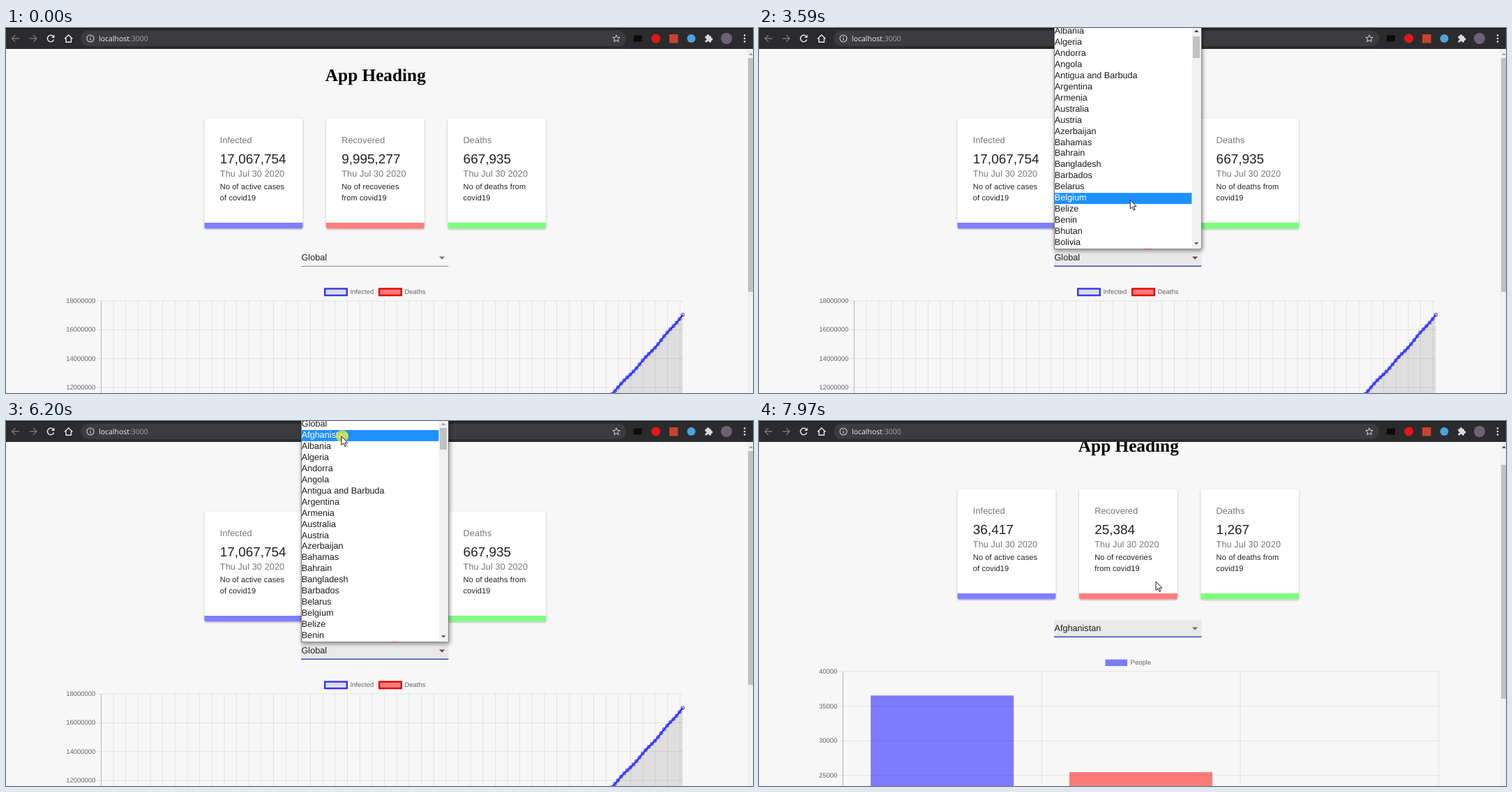
An HTML page with a canvas that plays this animation: 1071x523 px, repeating every 8000 ms.

```html
<!DOCTYPE html>
<html lang="en">
<head>
<meta charset="utf-8">
<title>Dashboard demo</title>
<style>
  html, body { margin: 0; width: 100%; height: 100%; overflow: hidden; background: #f7f7f7; }
  canvas { display: block; width: 1071px; height: 523px; }
</style>
</head>
<body>
<canvas id="stage" width="1071" height="523"></canvas>
<script>
const ctx = document.getElementById('stage').getContext('2d');
const W = 1071, H = 523, LOOP = 8000;
const SANS = '"Liberation Sans", Arial, sans-serif';
const SERIF = '"Liberation Serif", "Times New Roman", serif';
const UI = '"Open Sans", "Noto Sans", sans-serif';
const DARK = 'rgba(0,0,0,.87)', MUTED = 'rgba(0,0,0,.54)', GRID = 'rgba(0,0,0,.1)';
const BLUE = 'rgba(0,0,255,.5)', RED = 'rgba(255,0,0,.5)', GREEN = 'rgba(0,255,0,.5)';

const COUNTRIES = ('Global,Afghanistan,Albania,Algeria,Andorra,Angola,Antigua and Barbuda,Argentina,' +
  'Armenia,Australia,Austria,Azerbaijan,Bahamas,Bahrain,Bangladesh,Barbados,Belarus,Belgium,' +
  'Belize,Benin,Bhutan,Bolivia').split(',');
const CARDS = [
  { title: 'Infected', note: ['No of active cases', 'of covid19'], color: '#7f7fff', world: 17067754, local: 36542 },
  { title: 'Recovered', note: ['No of recoveries', 'from covid19'], color: '#ff7f7f', world: 9995277, local: 25471 },
  { title: 'Deaths', note: ['No of deaths from', 'covid19'], color: '#7fff7f', world: 667935, local: 1271 }
];

// Moments of redraw: [first, last, count]; the picture holds in between.
const STEPS = [
  [0, 0, 1], [840, 840, 1], [1030, 1130, 3], [1460, 1700, 4], [1770, 1940, 3], [2160, 2560, 6],
  [2820, 2820, 1], [2870, 3110, 4], [3590, 3750, 3], [4140, 4360, 4], [4760, 4910, 3],
  [5460, 6020, 8], [6200, 6200, 1], [6330, 6960, 9], [7030, 7260, 4], [7340, 7820, 7], [7890, 7970, 2]
].flatMap(([a, b, n]) => Array.from({ length: n }, (_, i) => a + (n > 1 ? (b - a) * i / (n - 1) : 0)));

// Pointer path: [time, x, y]
const PATH = [
  [980, 709, 510], [1130, 669, 445], [1400, 669, 445], [1700, 576, 328], [1940, 562, 334],
  [2740, 562, 334], [2820, 566, 329], [3110, 535, 253.5], [3530, 535, 253.5], [3750, 525, 228],
  [4080, 525, 228], [4360, 502, 120], [4700, 502, 120], [4910, 500, 141.5], [5390, 500, 141.5],
  [6020, 481, 22], [6330, 481, 22], [6960, 568, 229], [7260, 568, 229], [7820, 569, 230]
];
const OPEN = 2240, CLOSE = 6330, LOADED = 6381;
const ROW = 15.95;

const ARROW = new Path2D('M0 0V12.6L3 9.9L5 14.6L6.9 13.8L4.9 9.2H8.8Z');
const HAND = new Path2D('M3.5 11V1.8C3.5 .1 6.5 .1 6.5 1.8V6.6C7.5 5.9 9 6.2 9.2 7.2C10 6.6 11.3 7 11.5 8' +
  'C12.2 7.6 13.1 8 13.1 9V13L11.6 16.2V18.5H4.8V16.7L.7 11.6C0 10 1.6 9 3.5 11Z');

const clamp = (v, a = 0, b = 1) => Math.min(b, Math.max(a, v));

function rect(x, y, w, h, color) {
  ctx.fillStyle = color;
  ctx.fillRect(x, y, w, h);
}

function round(x, y, w, h, r, color) {
  ctx.fillStyle = color;
  ctx.beginPath();
  ctx.roundRect(x, y, w, h, r);
  ctx.fill();
}

function disc(x, y, r, color) {
  ctx.fillStyle = color;
  ctx.beginPath();
  ctx.arc(x, y, r, 0, 7);
  ctx.fill();
}

function poly(points, color) {
  ctx.fillStyle = color;
  ctx.beginPath();
  points.forEach(p => ctx.lineTo(...p));
  ctx.fill();
}

function stroke(d, color, width) {
  ctx.strokeStyle = color;
  ctx.lineWidth = width;
  ctx.stroke(new Path2D(d));
}

function text(s, x, y, size, color, { font = SANS, align = 'left', spacing = 0, weight = '' } = {}) {
  ctx.font = `${weight} ${size}px ${font}`;
  ctx.textAlign = align;
  ctx.letterSpacing = spacing + 'px';
  ctx.fillStyle = color;
  ctx.fillText(s, x, y);
}

function pointer(t) {
  const i = PATH.findIndex(p => p[0] > t);
  if (i === 0) return { x: PATH[0][1], y: PATH[0][2] };
  if (i < 0) return { x: PATH.at(-1)[1], y: PATH.at(-1)[2] };
  const [t0, x0, y0] = PATH[i - 1], [t1, x1, y1] = PATH[i];
  const k = (t - t0) / (t1 - t0);
  return { x: x0 + (x1 - x0) * k, y: y0 + (y1 - y0) * k };
}

function countUp(end, t) {
  const k = clamp(.433236 + (t - 7260) * .34979 / 710);
  return Math.round(end * (1 - 2 ** (-10 * k)) * 1024 / 1023);
}

function drawCards(t) {
  CARDS.forEach((c, i) => {
    const x = 284.5 + 174.4 * i, tx = x + 22.3;
    ctx.save();
    ctx.shadowColor = 'rgba(0,0,0,.3)';
    ctx.shadowBlur = 2.5;
    ctx.shadowOffsetY = 1;
    round(x, 129.5, 141, 158, 3.2, '#fff');
    ctx.restore();
    round(x, 279, 141, 8.5, [0, 0, 3.2, 3.2], c.color);
    const value = t < LOADED ? c.world : countUp(c.local, t);
    text(c.title, tx, 165, 12.65, MUTED, { spacing: .12 });
    text(value.toLocaleString('en-US'), tx, 193.7, 18.96, DARK);
    text('Thu Jul 30 2020', tx, 213.3, 12.65, MUTED, { spacing: .12 });
    c.note.forEach((s, n) => text(s, tx, 230.7 + 15.8 * n, 11.06, DARK, { spacing: .118 }));
  });
}

function drawSelect(t, p) {
  const focused = t >= OPEN;
  const hover = t >= 1460 && p.x > 423 && p.x < 634 && p.y > 316 && p.y < 343;
  if (focused) round(423, 317, 211.5, 25, [0, 0, 0, 0], '#e9e9e9');
  text(t < CLOSE ? 'Global' : 'Afghanistan', 423.5, 333.4, 12.65, DARK);
  const tint = focused && t < 7820 ? '#6b4a4a' : '#757575';
  poly([[621, 327.6], [629.2, 327.6], [625.1, 331.8]], tint);
  if (focused) rect(423, 340.5, 211.5, 1.6, '#3f51b5');
  else if (hover) rect(423, 340.7, 211.5, 1.3, '#555');
  else rect(423, 341.2, 211.5, .8, 'rgba(0,0,0,.55)');
}

function hLine(x0, x1, y) { rect(x0, y - .4, x1 - x0, .8, GRID); }
function vLine(x, color = GRID) { rect(x - .4, 391, .8, 400, color); }

function drawLineChart() {
  [['Infected', 457.2, GRID, '#3333ff'], ['Deaths', 535.2, RED, '#e60000']].forEach(([name, x, fill, edge]) => {
    rect(x, 373.6, 31.6, 9.5, fill);
    ctx.strokeStyle = edge;
    ctx.lineWidth = 2.4;
    ctx.strokeRect(x, 373.6, 31.6, 9.5);
    text(name, x + 36.2, 381, 9.5, '#666');
  });
  for (let i = 0; i < 4; i++) {
    const y = 391 + 41.35 * i;
    hLine(129, 970.4, y);
    text(String(18e6 - 2e6 * i), 128.4, y + 2.9, 9.5, '#666', { align: 'right' });
  }
  const day = 4.414;
  for (let i = 0; i < 48; i++) vLine(136.4 + day * 4 * i);
  vLine(136.4, 'rgba(0,0,0,.25)');

  const pts = Array.from({ length: 26 }, (_, k) =>
    [970.2 - day * k, 411 + 5.3 * k - .017 * k * k + .8 * Math.sin(.9 * k)]);
  poly([...pts, [pts.at(-1)[0], 560], [970.2, 560]], GRID);
  ctx.beginPath();
  pts.forEach(q => ctx.lineTo(...q));
  ctx.strokeStyle = '#3333ff';
  ctx.lineWidth = 2.4;
  ctx.stroke();
  pts.forEach(([x, y]) => {
    disc(x, y, 2.4, GRID);
    ctx.lineWidth = .9;
    ctx.stroke();
  });
}

function drawBarChart(t) {
  const unit = 49.6 / 5000, base = 391 + 40000 * unit;
  rect(496.5, 373.6, 31.6, 9.5, BLUE);
  text('People', 532.6, 381, 9.5, '#666');
  for (let i = 0; i < 4; i++) {
    const y = 391 + 49.6 * i;
    hLine(113, 975, y);
    text(String(40000 - 5000 * i), 112.4, y + 2.9, 9.5, '#666', { align: 'right' });
  }
  for (let i = 1; i < 4; i++) vLine(120.4 + 284.8 * i);
  vLine(120.4, 'rgba(0,0,0,.35)');
  const grow = 1 - (1 - clamp((t - LOADED) / 812)) ** 4;
  CARDS.forEach((c, i) => {
    const h = c.local * unit * grow;
    rect(160.2 + 284.8 * i, base - h, 205, h, [BLUE, RED, GREEN][i]);
  });
}

function drawScrollbar(s) {
  rect(1063, 30, 8, H - 30, '#f1f1f1');
  poly([[1065, 39], [1068, 35.6], [1071, 39]], s ? '#505050' : '#a3a3a3');
  rect(1064, 43 + .62 * s, 7, 335, '#c1c1c1');
}

function drawToolbar() {
  rect(0, 0, W, 30, '#2b2b2d');
  rect(0, 0, W, 1, '#111');
  round(107, 4, 782, 22, 11, '#3c3c3f');
  stroke('M19 15H8.5M13.5 10L8.5 15L13.5 20', '#77777a', 1.3);
  stroke('M33.5 15H44M39 10L44 15L39 20', '#77777a', 1.3);
  stroke('M67.8 12A4.7 4.7 0 1 0 68.6 16.5', '#e8eaed', 1.5);
  poly([[69.5, 9.5], [69.5, 14], [65, 14]], '#e8eaed');
  stroke('M84 15.5L89.7 10L95.4 15.5M86 14.5V20.3H93.4V14.5', '#e8eaed', 1.4);
  stroke('M126 15A5 5 0 1 1 116 15A5 5 0 1 1 126 15M121 14.2V18M121 11.8V13', '#d5d7da', 1.1);
  text('localhost', 133, 18.8, 10.5, '#f1f1f1', { font: UI });
  const w = ctx.measureText('localhost').width;
  text(':3000', 133 + w, 18.8, 10.5, '#a2a4a8', { font: UI });

  ctx.beginPath();
  for (let i = 0; i < 10; i++) {
    const a = Math.PI * (i / 5 - .5), r = i % 2 ? 2.4 : 5.4;
    ctx.lineTo(875 + r * Math.cos(a), 15.3 + r * Math.sin(a));
  }
  ctx.closePath();
  ctx.strokeStyle = '#d5d7da';
  ctx.lineWidth = 1;
  ctx.stroke();

  rect(900, 10.5, 12, 9, '#0b0b0b');
  disc(931.7, 15, 6.5, '#e2161b');
  rect(951, 9, 12.5, 12.5, '#c8432c');
  disc(982.5, 15, 6, '#4da3dc');
  rect(1002.5, 11.5, 8.5, 9, '#d8dade');
  disc(1006.5, 11.3, 2, '#d8dade');
  disc(1011.3, 16, 2, '#d8dade');
  disc(1002.8, 16.2, 1.5, '#2b2b2d');
  disc(1006.6, 20.2, 1.5, '#2b2b2d');
  disc(1033, 15, 8, '#6d6275');
  [10.5, 15, 19.5].forEach(y => disc(1059, y, 1.3, '#e8eaed'));
}

function drawPopup(t, p) {
  const first = t >= 3000 && t < 4800 ? 2 : 0;
  const over = t > 2820 && p.y < 316;
  const active = over ? first + Math.floor((p.y + 3) / ROW) : 0;
  ctx.save();
  ctx.shadowColor = 'rgba(0,0,0,.45)';
  ctx.shadowBlur = 6;
  ctx.shadowOffsetX = 1;
  ctx.shadowOffsetY = 2;
  rect(423, -6, 211.5, 323, '#767676');
  ctx.restore();
  rect(424, 0, 209.7, 316.2, '#fff');
  for (let i = 0; i < 20; i++) {
    const y = ROW * i - 3, n = first + i;
    if (n === active) rect(424, y, 196.6, ROW, '#1e90ff');
    text(COUNTRIES[n], 423.8, y + 11, 12.65, n === active ? '#fff' : '#1c1c1c');
  }
  rect(620.6, 0, 13.1, 316.2, '#f1f1f1');
  rect(622, 10 + first, 10, 31, '#c1c1c1');
  poly([[624, 6], [627.2, 2.6], [630.4, 6]], first ? '#404040' : '#a3a3a3');
  poly([[624, 307.2], [627.2, 310.6], [630.4, 307.2]], '#505050');
  if (t >= 3000) rect(552, 316, 10, 1, '#c05a5a');
}

function drawPointer(t, p) {
  const hand = p.y > 316 && p.y < 343 && p.x > 423 && p.x < 634;
  if ((t >= 2160 && t < 2400) || (t >= 6200 && t < CLOSE)) disc(p.x + 1, p.y, 9, 'rgba(240,236,50,.72)');
  ctx.save();
  ctx.translate(p.x - (hand ? 5 : 0), p.y);
  const shape = hand ? HAND : ARROW;
  ctx.fillStyle = '#fff';
  ctx.fill(shape);
  ctx.strokeStyle = '#111';
  ctx.lineWidth = .95;
  ctx.stroke(shape);
  if (hand) stroke('M9.2 7.2V10.5M11.5 8V10.5M6.5 6.6V10', '#111', .7);
  ctx.restore();
}

function draw(t) {
  const p = pointer(t);
  const scroll = 32 * clamp((t - 7740) / 230) ** 1.6;
  rect(0, 0, W, H, '#f7f7f7');
  ctx.save();
  ctx.translate(0, -scroll);
  text('App Heading', 529.8, 76, 25.28, '#000', { font: SERIF, weight: 'bold', align: 'center' });
  drawCards(t);
  drawSelect(t, p);
  if (t < LOADED) drawLineChart();
  else drawBarChart(t);
  ctx.restore();
  drawScrollbar(scroll);
  drawToolbar();
  if (t >= OPEN && t < CLOSE) drawPopup(t, p);
  if (t >= 840) drawPointer(t, p);
}

ctx.textRendering = 'geometricPrecision';
const start = performance.now();
function tick() {
  const t = (performance.now() - start) % LOOP;
  draw(STEPS.findLast(s => s <= t));
  requestAnimationFrame(tick);
}
tick();
</script>
</body>
</html>
```
